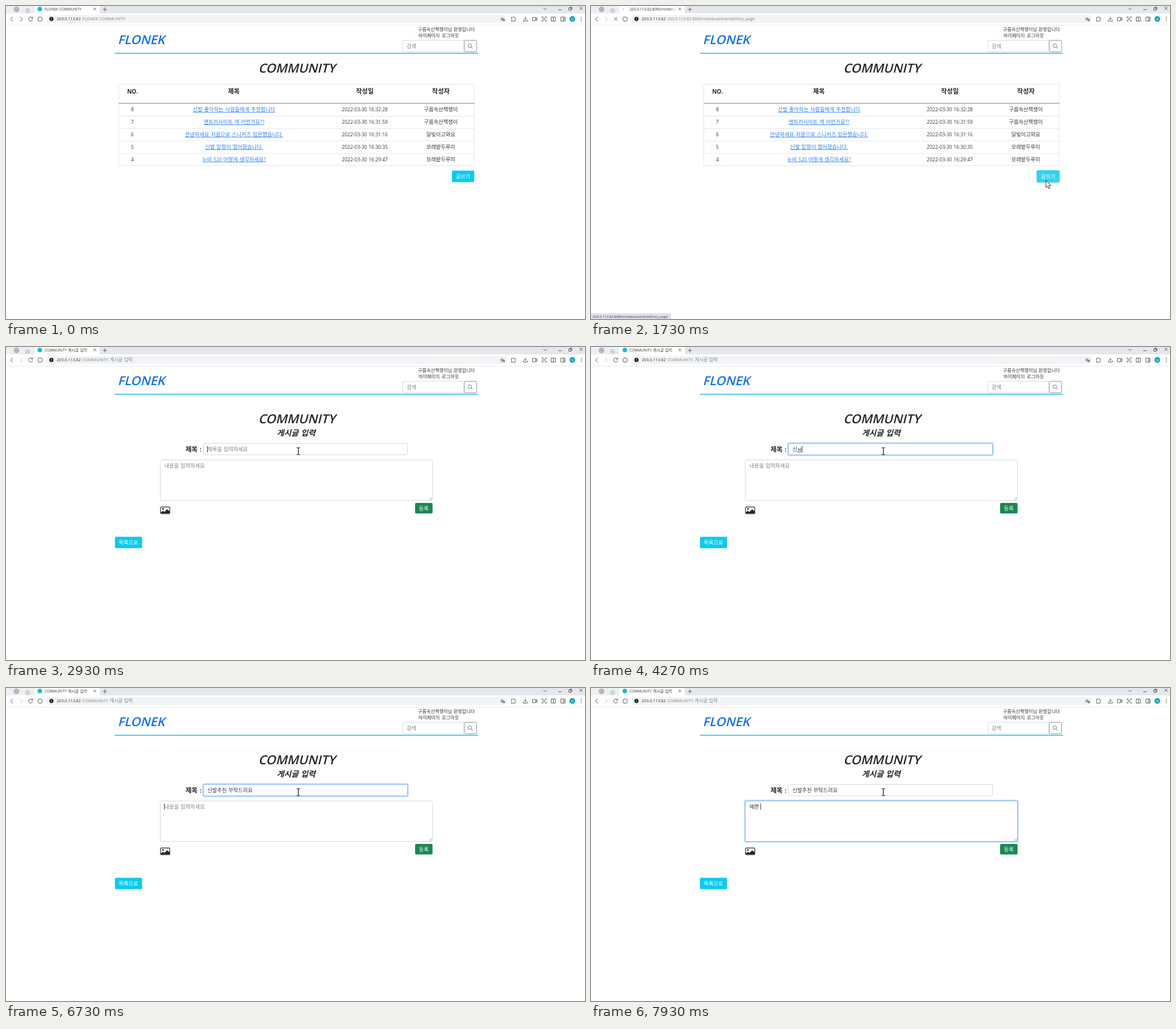
These frames come from a looping animation (1019 px wide and 550 px high, 8 s). An HTML page:

```html
<!DOCTYPE html>
<html lang="ko">
<head>
<meta charset="utf-8">
<title>Community board</title>
<style>
  html, body { margin: 0; width: 100%; height: 100%; overflow: hidden; background: #fff; }
  svg { display: block; width: 100%; height: 100%; }
  text { font-family: "Open Sans", "Noto Sans CJK KR", sans-serif; fill: #34393e; white-space: pre; word-spacing: .06em; }
  .mid { text-anchor: middle; }
  .bold { font-weight: 700; fill: #212529; }
  .title { font-weight: 600; }
  .link { fill: #2b7ffb; text-decoration: underline; text-decoration-thickness: .7px; }
  .hint { fill: #7a838a; }
  .white { fill: #fff; }
  .icon { fill: none; stroke: #3c4043; stroke-width: .85; }
  .field { fill: #fff; stroke: #ced4da; stroke-width: .85; }
  .ring { fill: none; stroke: #0d6efd; stroke-opacity: .25; stroke-width: 2.2; }
  .edge { fill: none; stroke: #86b7fe; }
  .compose { text-decoration: underline; text-decoration-thickness: .7px; }
</style>
</head>
<body>
<svg id="stage" viewBox="0 0 1019 550" preserveAspectRatio="none"></svg>
<script>
const LOOP = 8000;
const SITE = 'FLONEK';
const HOST = '203.0.113.82';
const LINK = HOST + ':8080/noteboard/writeEntry_page';
const USER = '구름속산책쟁이';

// Hangul is set slightly larger than the Latin around it.
const mix = s => s.replace(/[가-힣ㄱ-ㅎ][가-힣ㄱ-ㅎ ]*/g, m => `<tspan font-size="1.09em">${m}</tspan>`);
const text = (x, y, size, s, cls = '', more = '') =>
  `<text x="${x}" y="${y}" font-size="${size}" class="${cls}" ${more}>${mix(s)}</text>`;
const slant = (x, y, size, s, cls, fill = '#212529') =>
  `<g transform="translate(${x} ${y}) skewX(-14)">${text(0, 0, size, s, cls, `style="fill:${fill}"`)}</g>`;
const rect = (x, y, w, h, more = '') => `<rect x="${x}" y="${y}" width="${w}" height="${h}" ${more}/>`;
const path = (d, more = 'class="icon"') => `<path d="${d}" ${more}/>`;
const dot = (x, y, r, fill, more = '') => `<circle cx="${x}" cy="${y}" r="${r}" fill="${fill}" ${more}/>`;
const group = (id, body) => `<g id="${id}">${body}</g>`;

const browser = () =>
  rect(0, 0, 1019, 13, 'fill="#e4e7eb"') +
  rect(0, 0, 50, 13, 'fill="#edeff1"') +
  dot(18.5, 6, 5, '#b4b8bd') + dot(38, 8, 4.5, '#d0d4d8') +
  path('M50 13V2q0-2 2-2H163q2 0 2 2V13z', 'fill="#fff"') +
  dot(59.5, 5.3, 4, '#12c2bd', 'id="favicon"') +
  dot(57, 5.3, 1.2, '#c3c7cb', 'id="loading"') +
  `<g clip-path="url(#tabClip)">${text(68, 7.6, 6.4, '', '', 'id="tab"')}</g>` +
  rect(139, 1, 11, 10, 'fill="url(#fade)"') +
  path('M154.2 3l4.4 4.4m0-4.4l-4.4 4.4') +
  path('M170.5 6h7M174 2.5v7') +
  path('M946 3.6l2.8 2.8 2.8-2.8M972 6.5h6M990.5 3.5h4v4h-4zM992 3.5V2h4v4h-1.5M1009.5 1.5l5 5m0-5l-5 5') +
  rect(0, 13, 1019, 20, 'fill="#fff"') +
  rect(0, 33, 1019, .7, 'fill="#dfe2e5"') +
  rect(72, 16, 809, 14, 'rx="3" fill="#f1f3f4"') +
  path('M12 19l-4 4 4 4') +
  path('M25 19l4 4-4 4', 'class="icon" id="forward"') +
  path('M46.3 20.8a3.6 3.6 0 1 0 .6 2.6M47 18.8v2.6h-2.6', 'class="icon" id="reload"') +
  path('M40.5 19.7l6 6m0-6l-6 6', 'class="icon" id="stop"') +
  rect(56.5, 19.5, 7, 7, 'rx="1" class="icon"') +
  dot(80, 22.8, 3.7, '#202124') + rect(79.6, 20.6, .8, 2.8, 'fill="#fff"') + rect(79.6, 24, .8, .9, 'fill="#fff"') +
  text(89.3, 25.4, 7.1, HOST) +
  text(134.5, 25.4, 7.5, '', '', 'id="address" style="fill:#80868b"') +
  path('M873 18.7l1.2 2.6 2.8.3-2.1 1.9.6 2.8-2.5-1.4-2.5 1.4.6-2.8-2.1-1.9 2.8-.3z', 'fill="#9a9fa4"') +
  rect(874.5, 23, 3.5, 3.5, 'fill="#7d8287"') +
  path('M889.5 20h2q1-2.5 2.5 0h2v2q2.5 1.5 0 2.6v2h-6.5v-2.2q2.2-1 0-2.2z') +
  path('M914 18.5v5.5m-2.5-2.5l2.5 2.5 2.5-2.5M910.5 24v2.5h7V24') +
  path('M926.5 20h5.5v6h-5.5zM932 22l2.5-1.5v5l-2.5-1.5') +
  path('M943.5 21.5v-2.5h2.5m2.5 0h2.5v2.5m0 2.5v2.5h-2.5m-2.5 0h-2.5v-2.5') +
  dot(947, 22.7, 1.6, 'none', 'stroke="#3c4043" stroke-width=".85"') +
  path('M959.5 19.5h7.5v7h-7.5zM963.3 19.5v7M976.5 19.5h7.5v7h-7.5zM981 19.5v7M981 23h3') +
  dot(996.7, 22.8, 5, '#0ba5b5') + text(996.7, 24.7, 5, 'M', 'mid white') +
  [19.8, 22.8, 25.8].map(y => dot(1012.5, y, .8, '#3c4043')).join('');

const header = () =>
  slant(196.5, 67, 21.7, SITE, 'title', '#0d6efd') +
  text(725, 44, 7.5, USER + '님 환영합니다') +
  text(726, 55, 7.5, '마이페이지') + text(767, 55, 7.5, '로그아웃') +
  rect(698.3, 60.3, 108, 20, 'rx="2" class="field"') +
  text(705, 73.7, 8.5, '검색', 'hint') +
  rect(806.4, 60.3, 21.8, 20, 'rx="2" fill="#fff" stroke="#6c757d" stroke-width=".8"') +
  dot(816.3, 69.6, 3.1, 'none', 'stroke="#495057" stroke-width=".75"') +
  path('M818.6 72l2.7 2.7') +
  rect(191.5, 82.3, 639, 1.5, 'fill="#22bcd8"');

const posts = [
  ['신발 좋아하는 사람들에게 추천합니다', '32:28', USER],
  ['앤트러사이트 색 어떤가요??', '31:59', USER],
  ['안녕하세요 처음으로 스니커즈 입문했습니다.', '31:16', '달빛이고와요'],
  ['신발 밑창이 떨어졌습니다.', '30:35', '모래밭두루미'],
  ['누비 520 어떻게 생각하세요?', '29:47', '모래밭두루미']
];
const row = ([title, time, author], i) => {
  const y = 185.3 + i * 21.8;
  return text(222.5, y, 8.5, String(8 - i), 'mid') +
    text(401.3, y, 8.5, title, 'mid link') +
    text(631.5, y, 8.5, '2022-03-30 16:' + time, 'mid') +
    text(765.3, y, 8.5, author, 'mid') +
    (i ? rect(198.5, 171.4 + i * 21.8, 626, .8, 'fill="#dee2e6"') : '');
};
const list = () =>
  slant(511.8, 117.3, 21.8, 'COMMUNITY', 'mid title') +
  rect(198.4, 137.5, 625.7, 143, 'fill="none" stroke="#dee2e6" stroke-width=".85"') +
  text(222.5, 154.3, 10, 'NO.', 'mid bold') +
  text(401, 153.7, 10.3, '제목', 'mid bold') +
  text(631.5, 153.7, 10.3, '작성일', 'mid bold') +
  text(765.3, 153.7, 10.3, '작성자', 'mid bold') +
  rect(198.5, 170.5, 626, 1, 'fill="#75797d"') +
  posts.map(row).join('') +
  rect(783.7, 287.9, 41.8, 22.6, 'rx="3" fill="#98e8f8" id="pressed"') +
  rect(784.8, 289.2, 39.3, 20.2, 'rx="2" fill="#0dcaf0"') +
  rect(784.8, 289.2, 39.3, 20.2, 'rx="2" fill="#31d2f2" id="hover"') +
  text(804.5, 302.5, 8.5, '글쓰기', 'mid white');

const focus = (id, x, y, w, h) => group(id,
  rect(x - 1.2, y - 1.2, w + 2.4, h + 2.4, 'rx="3" class="ring"') + rect(x, y, w, h, 'rx="2" class="edge"'));
const form = () =>
  slant(511.8, 134.3, 21.8, 'COMMUNITY', 'mid title') +
  slant(510.5, 156, 12.7, '게시글 입력', 'mid bold') +
  text(316, 183.5, 10.6, '제목 :', 'bold') +
  rect(347.5, 169.5, 359, 20, 'rx="2" class="field"') + focus('titleRing', 347.5, 169.5, 359, 20) +
  text(354.5, 182.8, 8.5, '제목을 입력하세요', 'hint', 'id="titleHint"') +
  text(354.5, 182.8, 8.5, '', '', 'id="title"') +
  rect(271.5, 198.5, 479, 71, 'rx="2" class="field"') + focus('bodyRing', 271.5, 198.5, 479, 71) +
  text(278.8, 211.6, 8.5, '내용을 입력하세요', 'hint', 'id="bodyHint"') +
  text(278.8, 211.6, 8.5, '', '', 'id="body"') +
  path('M745 268.5l4.5-4.5M747.5 268.5l2-2', 'stroke="#777" stroke-width=".7"') +
  rect(272, 281.2, 16.2, 11.8, 'rx="1.5" fill="#fff" stroke="#212529" stroke-width="1.2"') +
  dot(276.2, 284.6, 1.5, '#212529') +
  path('M272.5 292.5v-2l3.5-2.5 3 1.7 4.5-4.5 4.5 3.3v4z', 'fill="#212529"') +
  rect(720, 274, 30.7, 18.5, 'rx="2" fill="#198754"') +
  text(735.3, 286.8, 8.5, '등록', 'mid white') +
  rect(191.7, 333.4, 47.8, 20.2, 'rx="2" fill="#0dcaf0"') +
  text(215.6, 346.8, 8.5, '목록으로', 'mid white') +
  rect(0, 0, .9, 11, 'fill="#212529" id="caret"');

const pointers = () =>
  group('arrow', path('M0 0V12.5L2.9 9.9 4.9 14.6 7 13.7 5 9.1H9z',
    'fill="#fff" stroke="#222" stroke-width=".9" stroke-linejoin="round"')) +
  group('hand', path('M-1.2 7V1q1.2-1.5 2.4 0V5l5.5 1.5q1 .5 1 2l-1 5.5H0L-4 9q0-2 2.8 0z',
    'fill="#fff" stroke="#222" stroke-width=".9" stroke-linejoin="round"')) +
  group('beam', path('M-3-5.5h2.2l.8.6.8-.6H3M0-5V6M-3 6.5h2.2L0 5.9l.8.6H3',
    'fill="none" stroke="#111" stroke-width="1.2"'));

document.getElementById('stage').innerHTML =
  `<defs><clipPath id="tabClip">${rect(66, 0, 83, 12)}</clipPath>
  <linearGradient id="fade"><stop stop-color="#fff" stop-opacity="0"/><stop offset="1" stop-color="#fff"/></linearGradient></defs>` +
  rect(0, 0, 1019, 550, 'fill="#fff"') + browser() + header() +
  group('list', list()) + group('form', form()) +
  group('status', rect(0, 540, 141, 10, 'fill="#dee1e6"') + text(3, 547.6, 6.1, LINK)) + pointers();

// [time, committed text, syllable being composed]
const titleKeys = [
  [0, '', ''], [3200, '', 'ㅅ'], [4000, '', '시'], [4130, '', '신'],
  [4270, '신', 'ㅂ'], [4330, '신', '바'], [4470, '신', '발'],
  [4670, '신발', 'ㅊ'], [4730, '신발', '추'], [4870, '신발', '춫'],
  [4930, '신발추', '처'], [5070, '신발추', '천'], [5130, '신발추천', ''], [5200, '신발추천 ', ''],
  [5330, '신발추천 ', 'ㅂ'], [5400, '신발추천 ', '부'], [5470, '신발추천 ', '붙'],
  [5600, '신발추천 부', '타'], [5670, '신발추천 부', '탁'],
  [5870, '신발추천 부탁', 'ㄷ'], [5930, '신발추천 부탁', '드'],
  [6070, '신발추천 부탁', '들'], [6200, '신발추천 부탁드', '려'],
  [6400, '신발추천 부탁드', '령'], [6530, '신발추천 부탁드려', '요'],
  [6730, '신발추천 부탁드려요', '']
];
const bodyKeys = [
  [0, '', ''], [7000, '', 'ㅇ'], [7200, '', '예'], [7530, '예', 'ㅃ'],
  [7730, '예', '쁘'], [7870, '예', '쁜'], [7930, '예쁜 ', '']
];
// [time, x, y]
const route = [
  [530, 1012, 386], [730, 905, 381], [1000, 797.5, 348.5], [1130, 794, 331], [1330, 800, 303],
  [1400, 800.7, 306.5], [1930, 800.7, 306.5], [2200, 770, 303], [2400, 690, 290],
  [2600, 572, 216], [2800, 514.5, 183.3], [2870, 514.5, 182.5]
];

const $ = id => document.getElementById(id);
const show = (id, on) => $(id).style.display = on ? '' : 'none';
const ramp = (t, a, b) => Math.min(1, Math.max(0, (t - a) / (b - a)));
const alpha = (id, v) => $(id).style.opacity = v;
const latest = (keys, t) => keys.filter(k => k[0] <= t).pop();
const setText = (id, html) => {
  const el = $(id);
  if (el.dataset.now !== html) { el.innerHTML = html; el.dataset.now = html; }
};

function along(t) {
  const i = route.findIndex(p => p[0] > t);
  if (i < 0) return route[route.length - 1].slice(1);
  if (i === 0) return route[0].slice(1);
  const [t0, x0, y0] = route[i - 1], [t1, x1, y1] = route[i];
  const k = ramp(t, t0, t1);
  return [x0 + (x1 - x0) * k, y0 + (y1 - y0) * k];
}

function typed(id, keys, t) {
  const [, done, now] = latest(keys, t);
  setText(id, mix(done) + (now && `<tspan class="compose">${mix(now)}</tspan>`));
  show(id + 'Hint', !(done + now));
  return done + now ? $(id).getComputedTextLength() : 0;
}

function pointer(t) {
  const [x, y] = along(t);
  const inBox = (l, a, r, b) => x > l && x < r && y > a && y < b;
  const overField = t >= 2000 && (inBox(347, 169, 707, 190) || inBox(271, 198, 751, 270));
  const kind = t < 530 ? '' : overField ? 'beam' : t >= 1400 && t < 1670 ? 'hand' : 'arrow';
  for (const id of ['arrow', 'hand', 'beam']) {
    show(id, id === kind);
    $(id).setAttribute('transform', `translate(${x} ${y})`);
  }
}

function render(time) {
  // The screen refreshes fifteen times a second.
  const t = Math.round(Math.floor((time + 4) * 3 / 200) * 20 / 3) * 10;
  const busy = t >= 1670 && t < 1800, writing = t >= 1800;

  show('list', !writing);
  show('form', writing);
  show('favicon', !busy);
  show('loading', busy);
  show('reload', !busy);
  show('stop', busy);
  alpha('forward', t < 1670 ? 1 : .35);
  const name = busy ? LINK : writing ? 'COMMUNITY 게시글 입력' : SITE + ' COMMUNITY';
  setText('tab', mix(name));
  setText('address', mix(name));
  $('address').setAttribute('font-size', busy ? 7.1 : 7.5);

  alpha('hover', ramp(t, 1330, 1530));
  alpha('pressed', ramp(t, 1530, 1670));
  alpha('status', ramp(t, 1330, 1470) * (1 - ramp(t, 1930, 2070)));

  const leave = ramp(t, 6770, 7000);
  alpha('titleRing', ramp(t, 3000, 3200) * (1 - leave));
  alpha('bodyRing', leave);
  if (writing) {
    const titleEnd = 354 + typed('title', titleKeys, t);
    const bodyEnd = 278.3 + typed('body', bodyKeys, t);
    const inBody = t >= 6730;
    show('caret', t >= 2930 && !(t >= 3800 && t < 4000));
    $('caret').setAttribute('x', inBody ? bodyEnd : titleEnd);
    $('caret').setAttribute('y', inBody ? 202.8 : 174);
  }
  pointer(t);
}

const start = performance.now();
function tick() {
  render((performance.now() - start) % LOOP);
  requestAnimationFrame(tick);
}
tick();
</script>
</body>
</html>
```
